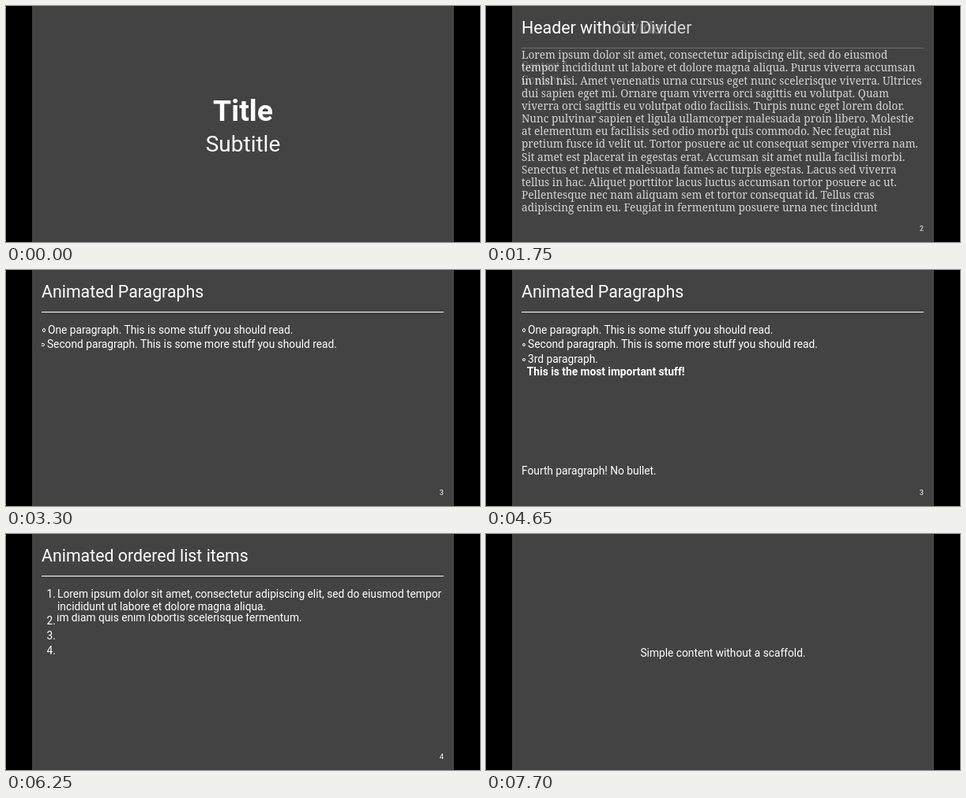
An HTML page that plays this animation: 600x300 px, repeating every 8000 ms.

```html
<!DOCTYPE html>
<html lang="en">
<head>
<meta charset="utf-8">
<title>Slides</title>
<style>
  html, body { margin: 0; width: 100%; height: 100%; overflow: hidden; background: #000; }
  #stage { position: relative; width: 600px; height: 300px; overflow: hidden; }
  .slide {
    position: absolute; left: 33px; top: 0; width: 534px; height: 300px;
    overflow: hidden; background: #434343; color: #fff;
    font: 13.75px/16.1px Roboto, sans-serif; white-space: nowrap;
  }
  .slide > * { position: absolute; left: 12px; margin: 0; }
  .slide > .center { left: 0; width: 100%; text-align: center; }
  h1 { top: 112px; font: bold 37.4px/43.8px Roboto, sans-serif; }
  .sub { top: 160px; font-size: 28px; line-height: 32.8px; }
  h2 { top: 15.4px; font: 21.33px/25px Roboto, sans-serif; }
  hr { top: 53px; width: 509px; height: 1px; border: 0; background: #fff; }
  .content { top: 66.5px; }
  .content p { margin: 0; padding: 1.25px 0; }
  .serif { top: 54.2px; font: 13.6px/16.17px "Noto Serif", serif; }
  .slide > .page { left: auto; right: 13px; top: 276.5px; font-size: 9.3px; line-height: 11px; }
  .reveal { position: relative; overflow: hidden; }
  .reveal > p { position: absolute; right: 0; bottom: 0; }
  .bullet::before {
    content: ""; display: inline-block; box-sizing: border-box;
    width: 4.4px; height: 4.4px; margin: 0 3.1px 2px .5px;
    border: 1px solid #fff; border-radius: 50%;
  }
  b { margin-left: 6.8px; }
  .content .low { padding-top: 108.4px; }
  .row { position: relative; min-height: 18.6px; padding-left: 20px; }
  .row > span { position: absolute; left: 6.5px; top: 1.25px; }
</style>
</head>
<body>
<div id="stage">
  <section class="slide" data-start="-400">
    <h1 class="center">Title</h1>
    <div class="center sub">Subtitle</div>
  </section>

  <section class="slide" data-start="1120">
    <h2>Header with Divider</h2><hr>
    <div class="content"><p>Content 1</p><p>Content 2</p></div>
    <div class="page">1</div>
  </section>

  <section class="slide" data-start="1440">
    <h2>Header without Divider</h2>
    <p class="serif">Lorem ipsum dolor sit amet, consectetur adipiscing elit, sed do eiusmod<br>
      tempor incididunt ut labore et dolore magna aliqua. Purus viverra accumsan<br>
      in nisl nisi. Amet venenatis urna cursus eget nunc scelerisque viverra. Ultrices<br>
      dui sapien eget mi. Ornare quam viverra orci sagittis eu volutpat. Quam<br>
      viverra orci sagittis eu volutpat odio facilisis. Turpis nunc eget lorem dolor.<br>
      Nunc pulvinar sapien et ligula ullamcorper malesuada proin libero. Molestie<br>
      at elementum eu facilisis sed odio morbi quis commodo. Nec feugiat nisl<br>
      pretium fusce id velit ut. Tortor posuere ac ut consequat semper viverra nam.<br>
      Sit amet est placerat in egestas erat. Accumsan sit amet nulla facilisi morbi.<br>
      Senectus et netus et malesuada fames ac turpis egestas. Lacus sed viverra<br>
      tellus in hac. Aliquet porttitor lacus luctus accumsan tortor posuere ac ut.<br>
      Pellentesque nec nam aliquam sem et tortor consequat id. Tellus cras<br>
      adipiscing enim eu. Feugiat in fermentum posuere urna nec tincidunt</p>
    <div class="page">2</div>
  </section>

  <section class="slide" data-start="2320">
    <h2>Animated Paragraphs</h2><hr>
    <div class="content">
      <div class="reveal" data-start="2720"><p class="bullet">One paragraph. This is some stuff you should read.</p></div>
      <div class="reveal" data-start="3043"><p class="bullet">Second paragraph. This is some more stuff you should read.</p></div>
      <div class="reveal" data-start="3600"><p class="bullet">3rd paragraph.<br><b>This is the most important stuff!</b></p></div>
      <div class="reveal" data-start="4320"><p class="low">Fourth paragraph! No bullet.</p></div>
    </div>
    <div class="page">3</div>
  </section>

  <section class="slide" data-start="4870">
    <h2>Animated ordered list items</h2><hr>
    <div class="content">
      <div class="row"><span>1.</span><div class="reveal" data-start="5627"><p>Lorem ipsum dolor sit amet, consectetur adipiscing elit, sed do eiusmod tempor<br>incididunt ut labore et dolore magna aliqua.</p></div></div>
      <div class="row"><span>2.</span><div class="reveal" data-start="6130"><p>Etiam dignissim diam quis enim lobortis scelerisque fermentum.</p></div></div>
      <div class="row"><span>3.</span><div class="reveal" data-start="6520"><p>Duis convallis convallis tellus id interdum velit.</p></div></div>
      <div class="row"><span>4.</span><div class="reveal" data-start="6860"><p>Tempor orci eu lobortis elementum nibh tellus molestie.</p></div></div>
    </div>
    <div class="page">4</div>
  </section>

  <section class="slide" data-start="7270">
    <div class="center" style="top:143px">Simple content without a scaffold.</div>
  </section>
</div>
<script>
  const LOOP = 8000, FADE = 400, GROW = 300;
  const slides = document.querySelectorAll(".slide");
  const reveals = document.querySelectorAll(".reveal");
  const progress = (t, el, length) =>
    Math.min(1, Math.max(0, (t - el.dataset.start) / length));
  const easeOut = x => 1 - (1 - x) ** 3;

  function render(t) {
    for (const el of slides) el.style.opacity = progress(t, el, FADE);
    // Each box grows in both directions, its text pinned to the bottom right.
    for (const el of reveals) {
      const size = el.firstElementChild.getBoundingClientRect();
      const f = easeOut(progress(t, el, GROW));
      el.style.width = size.width * f + "px";
      el.style.height = size.height * f + "px";
    }
  }

  const begin = performance.now();
  function tick() {
    render((performance.now() - begin) % LOOP);
    requestAnimationFrame(tick);
  }
  render(0);
  requestAnimationFrame(tick);
</script>
</body>
</html>
```
